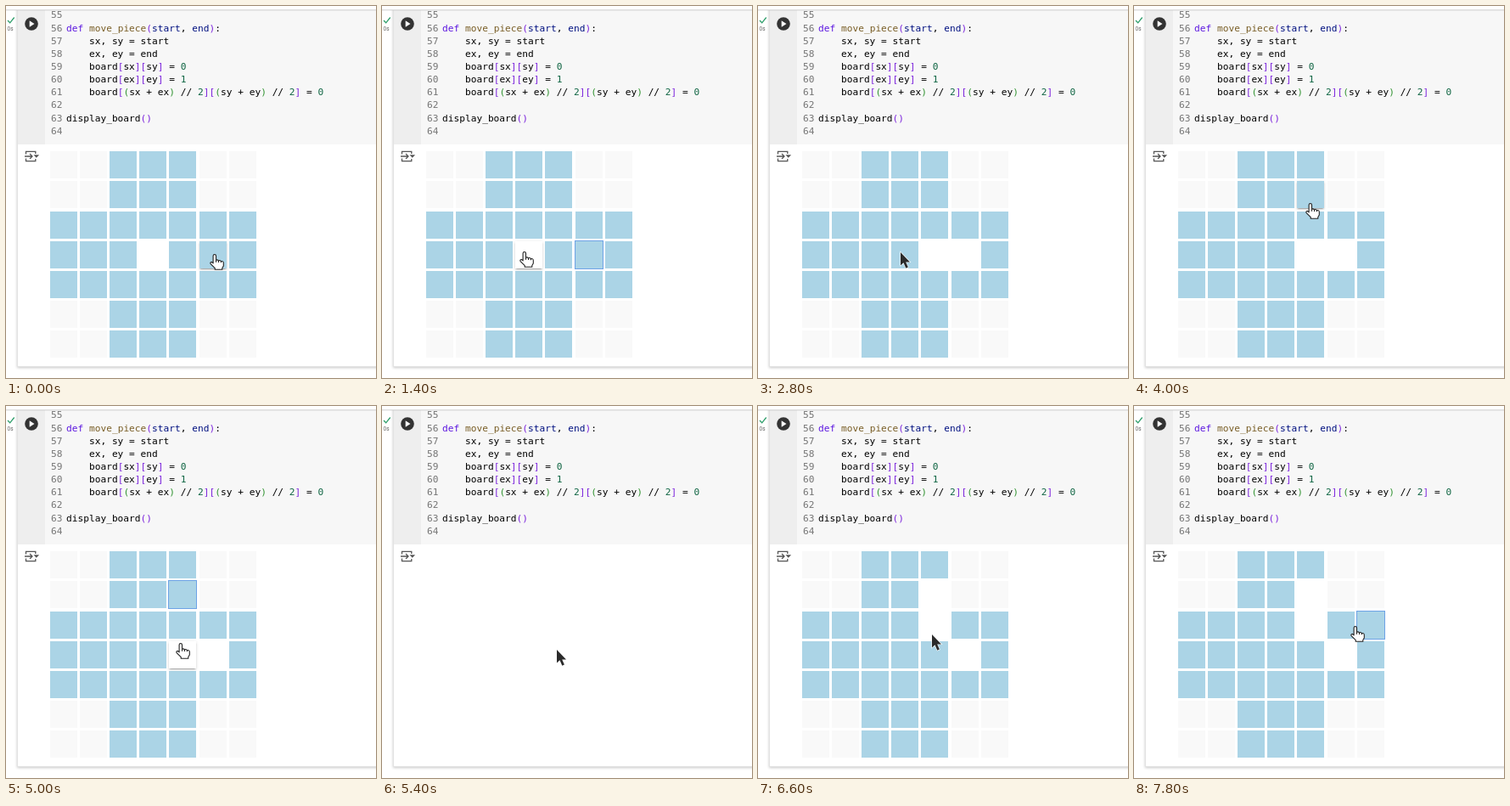
Write an HTML page that moves like this. It is 436x438 px and loops after 8 s.

```html
<!DOCTYPE html>
<html lang="en">
<head>
<meta charset="utf-8">
<title>Peg solitaire notebook</title>
<style>
  html, body { margin: 0; width: 100%; height: 100%; overflow: hidden; background: #fff; }
  #stage { position: relative; width: 436px; height: 438px; overflow: hidden; }
  #stage > svg { position: absolute; left: 0; top: 0; }
  .panel { position: absolute; left: 13px; top: -20px; width: 460px; height: 443px; border: 1px solid #e3e3e3;
    background: #fff; box-shadow: 0 1px 3px rgba(0, 0, 0, .22); }
  .code { font: 11.2px "DejaVu Sans Mono", monospace; white-space: pre; }
  .cell { position: absolute; width: 32px; height: 32px; background: #abd4e6; }
  .cell.off { background: #f9f9f9; }
  .cell.hole { background: #fff; }
  .cell.hover { z-index: 1; box-shadow: 0 1.6px 1.6px rgba(0, 0, 0, .14),
    0 2.4px .8px -1.6px rgba(0, 0, 0, .2), 0 .8px 4px rgba(0, 0, 0, .12); }
  .cell.focus { z-index: 2; outline: 1px solid #6ea3e6; }
</style>
</head>
<body>
<div id="stage">
  <div class="panel"></div>
  <svg width="436" height="438">
    <rect x="14" y="5" width="32" height="158" fill="#eee"/>
    <rect x="46" y="5" width="390" height="158" fill="#f7f7f7"/>
    <g id="code" class="code"></g>
    <rect width="436" height="4" fill="#fff"/>
    <rect y="4" width="436" height="1" fill="#dcdcdc"/>
    <rect y="5" width="436" height="1" fill="#000" opacity=".05"/>
    <circle cx="30" cy="21" r="7.8" fill="#333"/>
    <path d="M27.7 17.3v7.4l5.8-3.7z" fill="#fff"/>
    <path d="M2 17l2.7 2.8 5-6.3" fill="none" stroke="#2f9e6b" stroke-width="1.3"/>
    <text x="1.5" y="29" font-size="6.5" font-family="Roboto, sans-serif" fill="#666">0s</text>
    <g fill="none" stroke="#555" stroke-width="1.3">
      <path d="M23.5 174.5v-3.2h11.3v2.6M23.5 179.5v3.2h11.3v-2.6"/>
      <path d="M22 177h9M28 174l3 3-3 3"/>
    </g>
    <path d="M32.5 175.3h6.6l-3.3 3.4z" fill="#555"/>
  </svg>
  <div id="board"></div>
  <svg width="436" height="438" style="z-index:3">
    <path id="hand" fill="#fff" stroke="#222" stroke-width="1.1" stroke-linejoin="round"
      d="M-1.9 9V1.2a1.7 1.7 0 0 1 3.4 0V6.2q1.6-.9 3 .6 1.6-.8 2.9.7 2.9-.3 2.9 2.2v3.3l-1.5 2.6v1.6H.2v-1.6L-4.9 10.6q-.8-1.7.8-2.2 1.1 0 2.2 1.6zM1.5 6.2v2.6M4.5 6.8v2.2M7.4 7.5v1.8"/>
    <path id="arrow" fill="#2b2b2b" stroke="#fff" stroke-width="1.2" paint-order="stroke"
      d="M0 0V15.4l3.5-3.1 2.8 6.4 2.6-1.1-2.7-6.2H11z"/>
  </svg>
</div>
<script>
const LOOP = 8000, TICK = 200;
const $ = id => document.getElementById(id);

const source = `
def move_piece(start, end):
    sx, sy = start
    ex, ey = end
    board[sx][sy] = 0
    board[ex][ey] = 1
    board[(sx + ex) // 2][(sy + ey) // 2] = 0

display_board()
`.split('\n');

const span = (text, fill) => `<tspan fill="${fill}">${text}</tspan>`;

function highlight(line) {
  let depth = 0;
  const bracket = level => level ? '#319331' : '#7a22dc';
  return line.replace(/\w+|[()[\]]/g, word => {
    if ('(['.includes(word)) return span(word, bracket(depth++));
    if (')]'.includes(word)) return span(word, bracket(--depth));
    if (word === 'def') return span(word, '#5a14e0');
    if (word === 'move_piece') return span(word, '#795e26');
    if (/^\d/.test(word)) return span(word, '#116644');
    if (line.startsWith('def')) return span(word, '#001080');
    return word;
  });
}

$('code').innerHTML = source.map((line, i) => {
  const y = Math.round(14.46 + 15.14 * i);
  return `<text x="53" y="${y}" fill="#757575">${55 + i}</text>` +
    `<text x="71" y="${y}" fill="#000" style="white-space:pre">${highlight(line)}</text>`;
}).join('');

// The cross-shaped board, one cell per "row column" key
const place = (base, i) => Math.round(base + 35.2 * i);
const outer = i => i < 2 || i > 4;
const cells = [];
for (let r = 0; r < 7; r++) for (let c = 0; c < 7; c++) {
  const el = document.createElement('div');
  const x = place(51.6, c), y = place(171.2, r);
  el.style.left = x + 'px';
  el.style.top = y + 'px';
  $('board').append(el);
  cells.push({ el, x, y, key: `${r}${c}`, off: outer(r) && outer(c) });
}

// Each table holds [time, value...]; a row lasts until the next one
const boards = [
  [0, '33'], [1600, null], [1800, '33 35'], [2600, null], [2800, '34 35'],
  [5400, null], [5600, '14 34 35'], [6400, null], [6600, '14 24 35']
];
const focus = [[0, ''], [400, '35'], [1600, ''], [4400, '14'], [5400, ''], [7600, '26']];
const cursor = [
  [0, 'hand', 246, 293], [600, 'hand', 238, 293], [800, 'hand', 220, 292],
  [1000, 'hand', 198, 291], [1200, 'hand', 177, 290], [1400, 'hand', 168, 290],
  [1600, 'arrow', 168, 290],
  [3400, 'hand', 171, 286], [3600, 'hand', 184, 267], [3800, 'hand', 201, 244], [4000, 'hand', 208, 233],
  [4600, 'hand', 208, 242], [4800, 'hand', 207, 262], [5000, 'hand', 206, 280], [5200, 'hand', 206, 287],
  [5400, 'arrow', 206, 287],
  [6000, 'hand', 207, 279], [6200, 'hand', 207, 267],
  [6400, 'arrow', 205, 269],
  [7000, 'hand', 245, 255], [7200, 'hand', 277, 246], [7800, 'hand', 261, 260]
];
const at = (table, t) => table.filter(row => row[0] <= t).pop().slice(1);

function draw(t) {
  const [holes] = at(boards, t), [ring] = at(focus, t), [kind, x, y] = at(cursor, t);
  $('board').style.visibility = holes === null ? 'hidden' : 'visible';
  for (const cell of cells) {
    const over = kind === 'hand' && !cell.off &&
      x >= cell.x && x < cell.x + 32 && y >= cell.y && y < cell.y + 32;
    const names = ['cell'];
    if (cell.off) names.push('off');
    if (holes && holes.includes(cell.key)) names.push('hole');
    if (over) names.push('hover');
    if (ring === cell.key) names.push('focus');
    cell.el.className = names.join(' ');
  }
  for (const id of ['hand', 'arrow']) {
    $(id).setAttribute('transform', `translate(${x} ${y})`);
    $(id).style.display = id === kind ? '' : 'none';
  }
}

const start = performance.now();
let last = 0;
function frame() {
  const t = Math.floor(((performance.now() - start) % LOOP) / TICK) * TICK;
  if (t !== last) draw(last = t);
  requestAnimationFrame(frame);
}
draw(0);
requestAnimationFrame(frame);
</script>
</body>
</html>
```
